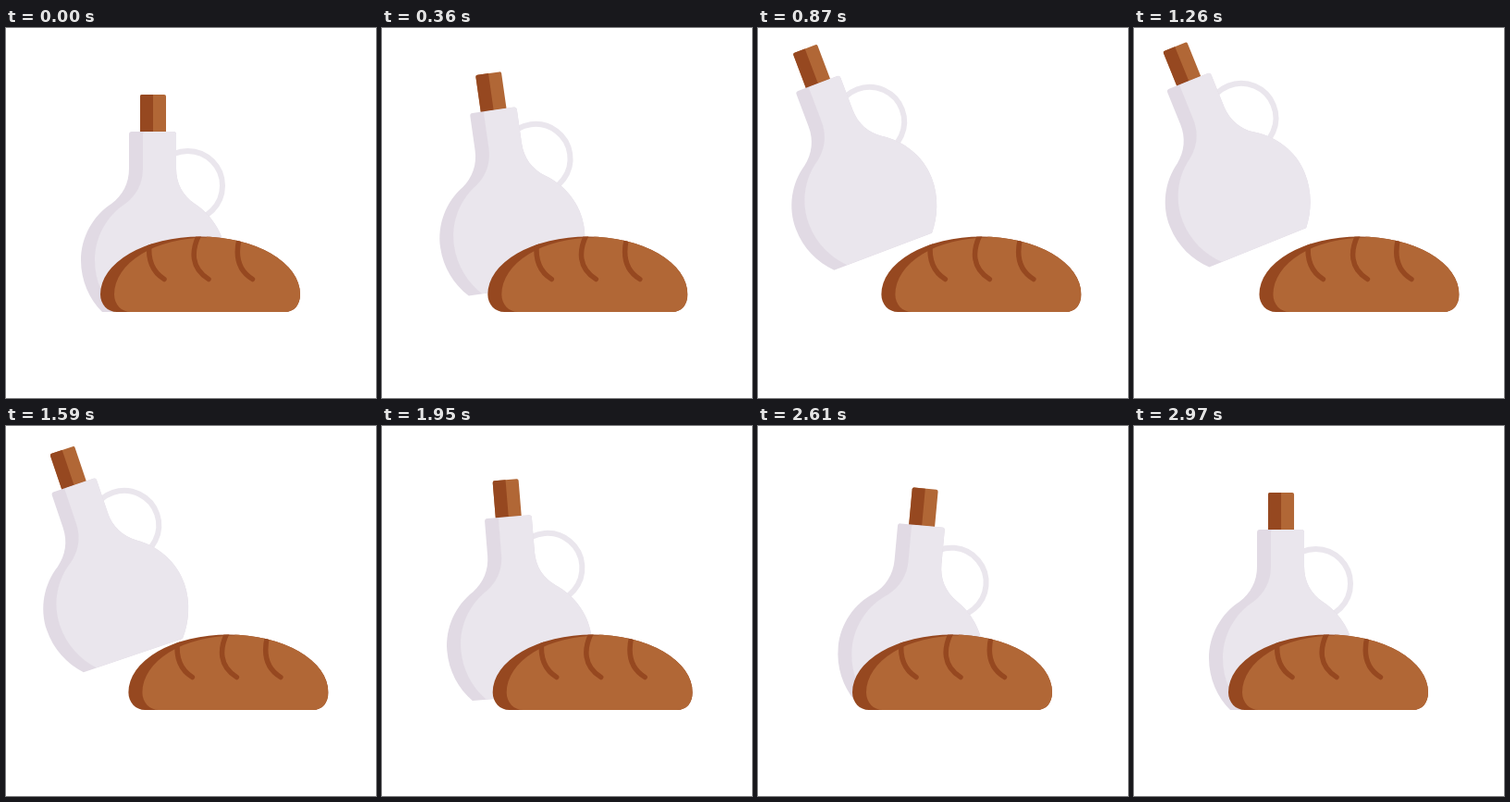
Recreate the animation shown at these times as an HTML page. Size 400 px wide and 400 px high, loop 5 s.

```html
<!DOCTYPE html>
<html lang="en">
<head>
<meta charset="utf-8">
<title>Bottle and bread</title>
<style>
  html, body { margin: 0; width: 100%; height: 100%; overflow: hidden; background: #fff; }
  svg { display: block; width: 100%; height: 100%; }
  .glass { fill: #eae6ed; }
  .glass-shade { fill: #e1dae4; }
  .crust { fill: #b16736; }
  .crust-shade { fill: #964820; }
</style>
</head>
<body>
<svg viewBox="0 0 400 400">
  <defs>
    <path id="flask" d="M136 112H181Q184 112 184 115V152C184 168 191 181 204 190C224 203 238 226 238 251
      C238 273 229 293 217 307H104C90 293 81 273 81 251C81 226 94 203 114 190C126 181 133 168 133 152V115Q133 112 136 112Z"/>
    <path id="loaf" d="M120 307C110 307 102 299 102 288A108 62.5 0 0 1 210 225.5A108 62.5 0 0 1 318 288
      C318 299 312 307 301 307Z"/>
    <clipPath id="flaskClip"><use href="#flask"/></clipPath>
    <clipPath id="loafClip"><use href="#loaf"/></clipPath>
  </defs>

  <g id="bottle">
    <circle cx="196.5" cy="170.5" r="37.5" fill="none" stroke="#eae6ed" stroke-width="6"/>
    <rect class="crust" x="145" y="72" width="28" height="42" rx="2"/>
    <path class="crust-shade" d="M159 72H147Q145 72 145 74V114H159Z"/>
    <use class="glass-shade" href="#flask"/>
    <g clip-path="url(#flaskClip)">
      <use class="glass" href="#flask" x="15"/>
    </g>
  </g>

  <g id="bread">
    <use class="crust-shade" href="#loaf"/>
    <g clip-path="url(#loafClip)">
      <path class="crust" d="M135 307C125 307 117 299 117 288A100 61.5 0 0 1 217 226.5L217 224H330V307Z"/>
      <g fill="none" stroke="#964820" stroke-width="5.5" stroke-linecap="round">
        <path d="M155 233C153 252 159 264 171 271.5"/>
        <path d="M209 223C200 241 200 260 219 271.5"/>
        <path d="M252 228C247 250 254 264 266.5 271.5"/>
      </g>
    </g>
  </g>
</svg>
<script>
  const LOOP = 5000, STEP = 30;
  const bottle = document.getElementById('bottle');
  const bread = document.getElementById('bread');

  // Cubic Bezier easing with control points (a, 0) and (b, 1).
  function ease(u, a, b) {
    if (u <= 0 || u >= 1) return u <= 0 ? 0 : 1;
    let low = 0, high = 1;
    for (let i = 0; i < 24; i++) {
      const s = (low + high) / 2, r = 1 - s;
      if (3 * a * s * r * r + 3 * b * s * s * r + s * s * s < u) low = s;
      else high = s;
    }
    return low * low * (3 - 2 * low);
  }

  function tween(t, start, end, from, to, a, b) {
    return from + (to - from) * ease((t - start) / (end - start), a, b);
  }

  function tilt(t) {
    if (t < 1200) return tween(t, 0, 1200, 0, -22.1, .33, .3);
    if (t < 2500) return tween(t, 1200, 2500, -22.1, 5.5, .59, .46);
    return tween(t, 2500, 2980, 5.5, 0, .7, .7);
  }

  function draw(t) {
    const angle = tilt(t);
    // The bottle lifts off while leaning left, and rocks on its corner when leaning right.
    const lift = Math.min(angle, 0);
    bottle.setAttribute('transform', `translate(${1.4 * lift} ${4.12 * lift}) rotate(${angle} 217 307)`);
    const shift = tween(Math.min(t, 2400 - t), 0, 1200, 0, 33.5, .33, .3);
    bread.setAttribute('transform', `translate(${shift} 0)`);
  }

  function frame() {
    const t = performance.now() % LOOP;
    draw(Math.floor(t / STEP) * STEP);
    requestAnimationFrame(frame);
  }
  frame();
</script>
</body>
</html>
```
